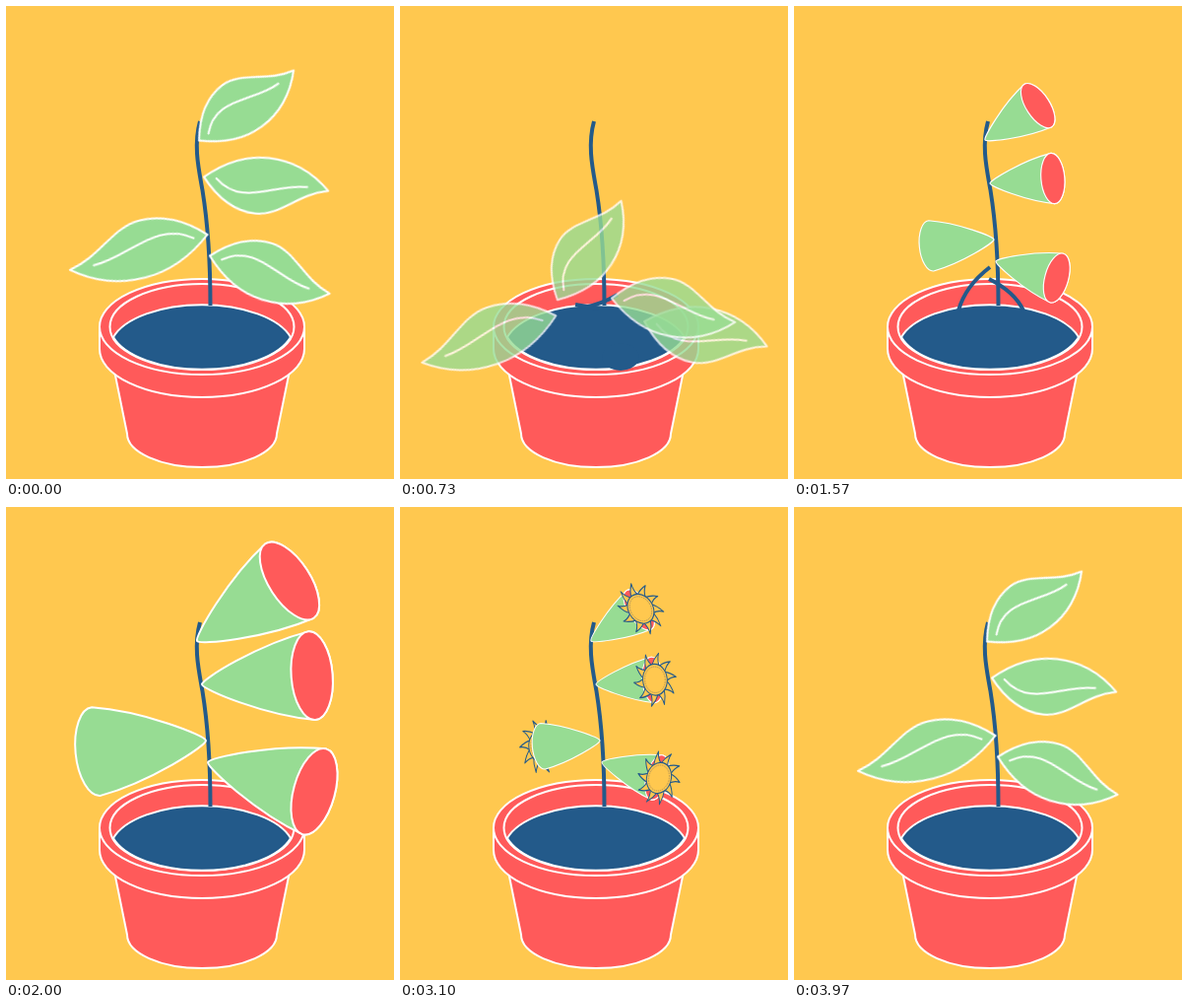
An HTML page that plays this animation: 394 px wide and 480 px high, repeating every 4010 ms.

```html
<!DOCTYPE html>
<html lang="en">
<head>
<meta charset="utf-8">
<title>Potted plant</title>
<style>
  html, body { margin: 0; width: 100%; height: 100%; overflow: hidden; background: #ffc84f; }
  svg { display: block; width: 394px; height: 480px; }
  .line { stroke: #fff; stroke-width: 2; stroke-linejoin: round; stroke-linecap: round; }
  .red { fill: #ff5a5a; }
  .green { fill: #97dc93; }
  .blue { fill: #235a8a; }
  .stem { fill: none; stroke: #235a8a; stroke-width: 4; }
  .sun path, .sun circle { fill: #ffc84f; stroke: #235a8a; stroke-width: 1.4; stroke-linejoin: round; }
  .sun .ring { fill: none; stroke: #a98f5a; stroke-width: 1; stroke-dasharray: 2 1; }

  .leaf, .cone, .bloom, .arm, .bulge { animation: 4010ms linear infinite; }
  .leaf { animation-name: sway, fall, fade, sprout; }
  .cone { animation-name: cone; }
  .bloom { animation-name: bloom; }
  .bulge { animation-name: bulge; }
  .arm.a { animation-name: armA; }
  .arm.b { animation-name: armB; }

  @keyframes sway {
    0% { rotate: 0deg; animation-timing-function: ease-in-out; }
    10.7% { rotate: var(--up); }
    11.5% { rotate: calc(var(--up) * 1.1); }
    18.2% { rotate: var(--drop); }
    22.44% { rotate: calc(var(--drop) * 1.6 - var(--up) * .6); }
    30%, 87.3% { rotate: var(--bud); }
    98.3%, 100% { rotate: 0deg; }
  }
  @keyframes fall {
    0%, 10.9% { translate: 0 0; }
    18.2% { translate: var(--dx) var(--dy); }
    22.44% { translate: calc(var(--dx) * 1.58) calc(var(--dy) * 1.62); }
    30%, 100% { translate: 0 0; }
  }
  @keyframes fade {
    0%, 17.2% { opacity: 1; }
    22.44%, 30% { opacity: 0; }
    30.01%, 100% { opacity: 1; }
  }
  @keyframes sprout {
    0%, 22.44% { scale: 1; }
    22.45% { scale: 0; }
    84.8% { scale: 0; animation-timing-function: cubic-bezier(.25, .4, .6, 1); }
    98.3%, 100% { scale: 1; }
  }
  @keyframes cone {
    0%, 30.2% { scale: 0; }
    45.9%, 71.6% { scale: 1; }
    83.5%, 100% { scale: 0; }
  }
  @keyframes bloom {
    0%, 54.1% { scale: 0; }
    64.1% { scale: 1; }
    72.1% { scale: 1.85; }
    77.3%, 83.5% { scale: 1.7; }
    100% { scale: 0; }
  }
  @keyframes bulge {
    0%, 13.2% { scale: 0; }
    18.2% { scale: 1; }
    22.4%, 100% { scale: 0; }
  }
  @keyframes armA {
    0%, 15% { d: path("M200 320Q205 320 210 320"); }
    18.2% { d: path("M186 306Q204 303 221 293"); }
    26.7%, 39.2% { d: path("M167 309Q174 284 199 265"); }
    44.9%, 100% { d: path("M168 320Q170 320 174 320"); }
  }
  @keyframes armB {
    0%, 15% { d: path("M200 320Q195 320 190 320"); }
    18.2% { d: path("M202 307Q190 305 178 303"); }
    26.7%, 39.2% { d: path("M233 309Q224 290 198 277"); }
    44.9%, 100% { d: path("M232 320Q230 320 226 320"); }
  }
</style>
</head>
<body>
<svg viewBox="0 0 394 480">
  <path class="red line" d="M110 370L123 434A76 34 0 0 0 275 434L288 370Z"/>
  <path class="red line" d="M95 326V348A104 49 0 0 0 303 348V326Z"/>
  <ellipse class="red line" cx="199" cy="325.5" rx="104" ry="48.5"/>
  <ellipse class="red line" cx="199" cy="325.5" rx="93.5" ry="43.5"/>
  <path class="blue line" d="M109 336A93.5 45 0 0 1 289 336A93.5 45 0 0 1 109 336Z"/>
  <g transform="translate(224 356)"><ellipse class="blue bulge" rx="19" ry="14"/></g>
  <path class="stem arm a" d="M200 320Q205 320 210 320"/>
  <path class="stem arm b" d="M200 320Q195 320 190 320"/>
  <path class="stem" d="M197 117C190 142 196 167 199.5 187C204 215 207.5 250 207.5 304"/>
  <g id="cones"></g>
  <g id="leaves"></g>
</svg>
<script>
  // Outline and vein on a unit chord; negative y is the side that curves in at the tip.
  const CURL = [[.1, -.5], [.24, -1], [.44, -1], [.64, -1], [.76, -.2], [1, 0]];
  const BELLY = [[.88, .55], [.72, 1], [.5, 1], [.27, 1], [.1, .42], [0, 0]];
  const VEIN = [[.33, -.85], [.56, .06], [.83, .06]];
  const CURL_HEIGHT = 31, BELLY_HEIGHT = 26.5;

  const leaves = [
    { x: 196, y: 136.5, len: 119.5, angle: -36.5, up: -19.5, drop: -20.7, dx: -36, dy: 161, bud: -40 },
    { x: 201, y: 173.5, len: 127, angle: 6.4, side: -1, up: -20.3, drop: 5, dx: 47, dy: 146, bud: 0 },
    { x: 204.5, y: 232, len: 144, angle: 14.4, mirror: true, up: 34, drop: -4.7, dx: -46, dy: 82, bud: 0 },
    { x: 207, y: 253.5, len: 127.5, angle: 17.5, up: -38, drop: -6.7, dx: 8, dy: 43, bud: 0 }
  ];

  const cones = [
    { x: 194, y: 136, angle: -33 },
    { x: 199, y: 180, angle: -4.5 },
    { x: 203, y: 237, angle: 5.7, mirror: true },
    { x: 205, y: 259, angle: 15.4 }
  ];

  const pose = p => (p.mirror ? 'scale(-1 1) ' : '') + `rotate(${p.angle})`;

  function leaf(p) {
    const side = p.side || 1;
    const at = ([x, y]) => `${x * p.len} ${y * side * (y < 0 ? CURL_HEIGHT : BELLY_HEIGHT)}`;
    const curve = pts => 'C' + pts.map(at).join(' ');
    return `<g transform="translate(${p.x} ${p.y})">
      <g class="leaf" style="--up:${p.up}deg;--drop:${p.drop}deg;--bud:${p.bud}deg;--dx:${p.dx}px;--dy:${p.dy}px">
        <g class="line" transform="${pose(p)}">
          <path class="green" d="M0 0${curve(CURL)}${curve(BELLY)}Z"/>
          <path fill="none" d="M${at([.1, 0])}${curve(VEIN)}"/>
        </g>
      </g></g>`;
  }

  function sun() {
    let rays = '';
    for (let a = 0; a < 360; a += 36)
      rays += `<path transform="rotate(${a + 8})" d="M-5.5 -16Q-3 -24 4 -31Q2 -23 5.5 -16Z"/>`;
    return `<g transform="translate(116 0) scale(.78 1)"><g class="bloom sun">
      ${rays}<circle r="18"/><circle class="ring" r="15"/></g></g>`;
  }

  function cone(p) {
    const body = '<path class="green line" d="M0 0C0 -5 60 -36 112 -45A21 45 0 0 1 112 45C60 36 0 5 0 0Z"/>';
    const mouth = '<ellipse class="red line" cx="112" rx="21" ry="45"/>';
    // The mirrored cone faces away, so its flower sits behind it.
    const parts = p.mirror ? sun() + body : body + mouth + sun();
    return `<g transform="translate(${p.x} ${p.y})"><g class="cone">
      <g transform="${pose(p)}">${parts}</g></g></g>`;
  }

  document.getElementById('cones').innerHTML = cones.map(cone).join('');
  document.getElementById('leaves').innerHTML = leaves.map(leaf).join('');
</script>
</body>
</html>
```
